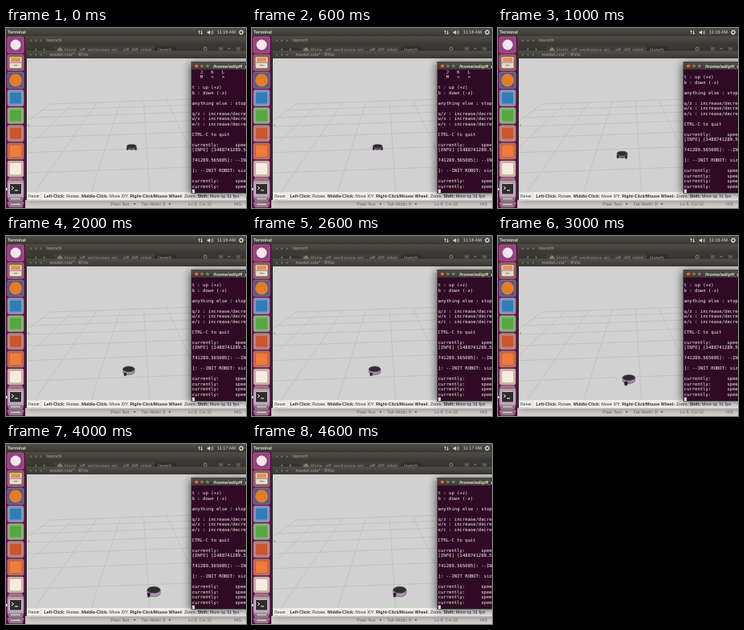
These frames come from a looping animation (300 px wide and 225 px high, 5000 ms). An HTML page:

```html
<!DOCTYPE html>
<html lang="en">
<head>
<meta charset="utf-8">
<title>Robot simulation desktop</title>
<style>
html, body { margin: 0; width: 100%; height: 100%; overflow: hidden; background: #3c3b37; }
svg { display: block; width: 100vw; height: 100vh; }
text { font-family: "Liberation Sans", Arial, sans-serif; white-space: pre; }
.mono { font-family: "DejaVu Sans Mono", "Liberation Mono", monospace; }
.b { font-weight: bold; }
</style>
</head>
<body>
<svg id="stage" viewBox="0 0 300 225" preserveAspectRatio="none">
  <defs>
    <linearGradient id="bar" x2="0" y2="1"><stop stop-color="#504e48"/><stop offset="1" stop-color="#3a3833"/></linearGradient>
    <linearGradient id="dock" x2="0" y2="1"><stop stop-color="#6f1759"/><stop offset="1" stop-color="#5a1246"/></linearGradient>
    <filter id="soft" x="-50%" y="-50%" width="200%" height="200%"><feGaussianBlur stdDeviation="5.5"/></filter>
    <clipPath id="viewClip"><rect x="27" y="38" width="273" height="167"/></clipPath>
    <clipPath id="hintClip"><rect x="44" y="205" width="230" height="11"/></clipPath>
    <clipPath id="termClip"><rect x="232" y="52" width="68" height="154"/></clipPath>
  </defs>
  <g id="windows"></g>
  <g clip-path="url(#viewClip)"><g id="grid"></g><g id="robot"></g></g>
  <g id="footer"></g>
  <g id="terminal"></g>
  <g id="dockArea"></g>
  <g id="panel"></g>
</svg>
<script>
const STEP = 1000;
const $ = id => document.getElementById(id);

function add(parent, tag, attrs, content) {
  const el = document.createElementNS("http://www.w3.org/2000/svg", tag);
  for (const key in attrs) el.setAttribute(key, attrs[key]);
  if (content !== undefined) el.textContent = content;
  parent.appendChild(el);
  return el;
}
const rect = (p, x, y, width, height, fill, more) => add(p, "rect", { x, y, width, height, fill, ...more });
const disc = (p, cx, cy, rx, ry, fill, more) => add(p, "ellipse", { cx, cy, rx, ry, fill, ...more });
const path = (p, d, attrs) => add(p, "path", { d, fill: "none", ...attrs });
const label = (p, x, y, size, fill, text, cls = "") =>
  add(p, "text", { x, y, "font-size": size, fill, class: cls }, text);
const shadow = (p, x, y, w, h, opacity) => rect(p, x, y + 2, w, h, "#000", { opacity, filter: "url(#soft)" });

function buttons(p, x, y, r, gap, fills) {
  fills.forEach((fill, i) => disc(p, x + i * gap, y, r, r, fill, { stroke: "#2b2a26", "stroke-width": .6 }));
}

function drawWindows() {
  const g = $("windows"), dim = "#8f8b82", grey = Array(3).fill("#605e57");
  rect(g, 24, 10, 276, 206, "#3c3b37");
  rect(g, 24, 10, 276, 11, "url(#bar)");
  buttons(g, 31, 15.5, 2.2, 6.4, grey);
  label(g, 51, 17.4, 5.8, dim, "launch", "b");

  rect(g, 60, 22.5, 153, 9, "#45433e", { rx: 1.5 });
  rect(g, 186, 22.5, 27, 9, "#34332f", { rx: 1.5 });
  path(g, "M36 27l2-2v4zM47 25l2 2-2 2z", { fill: dim });
  path(g, "M64 27l3.5-3 3.5 3v3h-7z", { fill: dim });
  const crumbs = [[73, "Home"], [92, "pff_workspace"], [132, "src"], [147, "pff_diff_robot"], [190, "launch"]];
  for (const [x, name] of crumbs) label(g, x, 28.8, 5.4, dim, name, "b");
  disc(g, 249, 26, 2, 2, "none", { stroke: dim });
  path(g, "M266 25h5M266 27h5M277 27l2-2 2 2M288 25h5M288 27h5", { stroke: dim, "stroke-width": .9 });

  // Status bar of the rear window, below the front one.
  rect(g, 24, 215, 276, 10, "#d6d3d0");
  const status = [[131, "Plain Text"], [169, "Tab Width: 8"], [228, "Ln 8, Col 32"], [285, "INS"]];
  for (const [x, text] of status) label(g, x, 222, 5.4, "#77736f", text);
  for (const x of [159, 203]) path(g, `M${x} 219h3.4l-1.7 2.4z`, { fill: "#77736f" });

  shadow(g, 26, 29, 290, 185, .42);
  rect(g, 26, 28.5, 274, 10, "url(#bar)");
  buttons(g, 31, 33.3, 2.2, 6.4, grey);
  label(g, 54.5, 35.2, 5.8, dim, "model.rviz* - RViz", "b");
  rect(g, 26, 38, 274, 168, "#d1d1d1");
}

// Ground plane in perspective: lines meet at (167, 17), row heights follow 1 / depth.
function drawGrid() {
  const g = add($("grid"), "g", { transform: "translate(0 5) skewY(-2)" });
  const rowY = i => 17 + 1 / (.01333 - .00118 * i);
  const colX = (k, y) => 167 + (k + .17) * .388 * (y - 17);
  let d = "";
  for (let i = 0; i <= 9; i++) {
    const y = rowY(i);
    d += `M${colX(-4, y)} ${y}H${colX(6, y)}`;
  }
  for (let k = -4; k <= 6; k++)
    d += `M${colX(k, rowY(0))} ${rowY(0)}L${colX(k, rowY(9))} ${rowY(9)}`;
  path(g, d, { stroke: "#bababb", "stroke-width": .65 });
}

// top centre x, y, radii, body height, wheels [dx, dy, rx, ry]
const poses = [
  { x: 157, y: 147.6, rx: 5.8, ry: 2.2, h: 2.4, side: "#655467", wheels: [[-5, 3.4, 1.3, 1.9], [5.3, 3.4, 1.3, 1.9]] },
  { x: 155.2, y: 156.8, rx: 6.4, ry: 2.8, h: 3, side: "#77607b", wheels: [[-5.4, 4.2, 1.4, 2.3], [5, 4.8, 1.4, 2.3]] },
  { x: 153.4, y: 166.3, rx: 7.2, ry: 3.4, h: 3.7, side: "#a58ca9", wheels: [[-4.4, 6.6, 1.8, 2.2]] },
  { x: 163.5, y: 177, rx: 7.7, ry: 3.4, h: 4, side: "#a18ba4", wheels: [[-3.4, 7.2, 2.3, 2.8]] },
  { x: 184.7, y: 182.3, rx: 8.1, ry: 4, h: 4.5, side: "#b292b5", wheels: [[-6.2, 6.4, 1.9, 3]] }
];

function drawRobot({ x, y, rx, ry, h, side, wheels }) {
  const g = add($("robot"), "g", { transform: `translate(${x} ${y})` });
  path(g, `M${-rx} 0v${h}A${rx} ${ry} 0 0 0 ${rx} ${h}V0z`, { fill: side, stroke: "#403544", "stroke-width": .5 });
  disc(g, 0, 0, rx, ry, "#302d31", { stroke: "#4a424c", "stroke-width": .5 });
  for (const [dx, dy, a, b] of wheels) {
    disc(g, dx, dy, a, b, "#29222c");
    disc(g, dx + a * .5, dy + b * .5, .5, .6, "#9b759e");
  }
  return g;
}

function drawFooter() {
  const g = $("footer"), ink = "#33312e";
  rect(g, 26, 205, 274, 10.5, "#efeeec");
  rect(g, 26.5, 206, 17, 8.5, "#f7f6f5", { rx: 1, stroke: "#c2bfba", "stroke-width": .5 });
  label(g, 28, 212, 5.3, ink, "Reset");
  const hints = [
    "Left-Click:", " Rotate. ", "Middle-Click:", " Move X/Y. ",
    "Right-Click/Mouse Wheel:", " Zoom. ", "Shift:", " More options."
  ];
  const clip = add(g, "g", { "clip-path": "url(#hintClip)" });
  const line = label(clip, 47.5, 212, 5.4, ink);
  hints.forEach((text, i) => add(line, "tspan", { class: i % 2 ? "" : "b" }, text));
  label(g, 276, 212, 5.6, ink, "31 fps");
}

const SPEED = "currently:      speed";
const output = [
  "   J   K   L", "   M   <   >", "", "t : up (+z)", "b : down (-z)", "",
  "anything else : stop", "", "q/z : increase/decrease", "w/x : increase/decrease",
  "e/c : increase/decrease", "", "CTRL-C to quit", "", SPEED,
  "[INFO] [1488741289.565", "", "741289.565085]: --INIT", "", "]: --INIT ROBOT: size",
  "", SPEED, SPEED, SPEED, SPEED
];
const PITCH = 6.5;

function drawTerminal() {
  const g = $("terminal");
  shadow(g, 230, 42, 90, 164, .6);
  rect(g, 231.5, 42, 68.5, 164.5, "#2a2926");
  rect(g, 232, 42.3, 68, 10.2, "url(#bar)");
  buttons(g, 238, 47.5, 2.6, 6.9, ["#e9603b", "#77746b", "#77746b"]);
  label(g, 259, 49.6, 6.1, "#e5e1d8", "/home/ed/pff_workspace", "b");
  rect(g, 232, 52, 68, 154, "#300a24");
  const clip = add(g, "g", { "clip-path": "url(#termClip)" });
  const lines = add(clip, "g", {});
  output.forEach((text, i) => label(lines, 232.6, 56.8 + i * PITCH, 5.6, "#f2edf0", text, "mono"));
  rect(clip, 232.8, 201.7, 3, 4.5, "#f2edf0");
  return lines;
}

// Square launcher tiles, top to bottom: tile colour, then what stands on it.
const launchers = [
  ["#96427c", (g, y) => disc(g, 12, y, 6.5, 6.5, "#f1e6ed")],
  ["#8a6152", drawDrawer],
  ["#4f5d8a", (g, y) => disc(g, 12, y, 8, 8, "#e57b25")],
  ["#7e98b5", (g, y) => emblem(g, y, "#317db8")],
  ["#86b07d", (g, y) => emblem(g, y, "#55a83d")],
  ["#b08a78", (g, y) => emblem(g, y, "#c9562f")],
  ["#c06a45", (g, y) => emblem(g, y, "#f07a3c")],
  ["#cdb4a4", (g, y) => emblem(g, y, "#f6ebe0")]
];

function emblem(g, y, fill) {
  rect(g, 5, y - 7, 14, 14, fill, { rx: 1 });
}

function drawDrawer(g, y) {
  rect(g, 4.5, y - 7, 15, 14, "#e4dcd1", { rx: 1 });
  rect(g, 6, y - 6, 12, 5, "#ed8d50");
  path(g, `M4.5 ${y}h15M9.5 ${y + 3.5}h5`, { stroke: "#8c7c70" });
}

function drawDock() {
  const g = $("dockArea");
  const edge = { stroke: "#b48ba6", "stroke-width": .6 };
  rect(g, 0, 10, 24, 215, "url(#dock)");
  rect(g, 23.6, 10, .5, 215, "#2b0b20");
  launchers.forEach(([fill, draw], i) => {
    const y = 21 + 22.15 * i;
    rect(g, 2, y - 10, 20, 20, fill, { rx: 2, ...edge });
    draw(g, y);
  });

  // Folded tiles above and below the active one.
  path(g, "M4 187h16l2 5H2z", { fill: "#8b7a84", ...edge });
  path(g, "M7 190.5h10", { stroke: "#d5533b", "stroke-width": 1.7 });
  path(g, "M2 211h20l-2 6H4z", { fill: "#86747f", ...edge });
  path(g, "M6 213.5h12", { stroke: "#d3cbd0", "stroke-width": 1.6 });
  path(g, "M2 218h20l-2 6H4z", { fill: "#86747f", ...edge });
  path(g, "M6 220.5h12", { stroke: "#d3cbd0", "stroke-width": 1.6 });

  rect(g, 2, 191.5, 20, 20, "#b5a5af", { rx: 2, ...edge });
  rect(g, 4.5, 194.5, 15, 13.5, "#302b30", { rx: 1, stroke: "#e1dadd", "stroke-width": .8 });
  path(g, "M7 198l2.5 2-2.5 2M11 203h4", { stroke: "#fff", "stroke-width": 1 });
  path(g, "M0 199.5l2 2-2 2z", { fill: "#fff" });
}

function drawPanel() {
  const g = $("panel"), ink = "#dfdbd2";
  rect(g, 0, 0, 300, 10.3, "url(#bar)");
  label(g, 2, 7.2, 5.6, ink, "Terminal", "b");
  path(g, "M241.5 7.5V3l-1.3 1.6M241.5 3l1.3 1.6M244.5 3v4.8l-1.3-1.6M244.5 7.8l1.3-1.6", { stroke: ink, "stroke-width": .8 });
  path(g, "M251.5 4.4h1.5l2-1.7v5.6l-2-1.7h-1.5z", { fill: ink });
  path(g, "M256.3 4q1 1.5 0 3M257.8 3q1.8 2.5 0 5", { stroke: ink, "stroke-width": .7 });
  const clock = label(g, 264, 7.4, 5.6, ink, "");
  disc(g, 294, 5.4, 2, 2, "none", { stroke: ink, "stroke-width": 1.1 });
  disc(g, 294, 5.4, 2.8, 2.8, "none", { stroke: ink, "stroke-width": .8, "stroke-dasharray": "1.1 1.1" });
  return clock;
}

drawWindows();
drawGrid();
const robots = poses.map(drawRobot);
const handle = disc($("robot"), 28.2, 121.5, .9, .9, "#999");
drawFooter();
const lines = drawTerminal();
drawDock();
const clock = drawPanel();

let shown = -1;
function tick() {
  const step = Math.floor(performance.now() / STEP) % poses.length;
  if (step !== shown) {
    shown = step;
    robots.forEach((r, i) => r.setAttribute("visibility", i === step ? "visible" : "hidden"));
    lines.setAttribute("transform", `translate(0 ${step ? -2 * PITCH : 0})`);
    // The last two printed lines only fit once the text has scrolled.
    [...lines.children].slice(-2).forEach(l => l.setAttribute("visibility", step ? "visible" : "hidden"));
    handle.setAttribute("fill", step < 3 ? "#999" : "#b87f78");
    clock.textContent = step < 4 ? "11:16 AM" : "11:17 AM";
  }
  requestAnimationFrame(tick);
}
tick();
</script>
</body>
</html>
```
